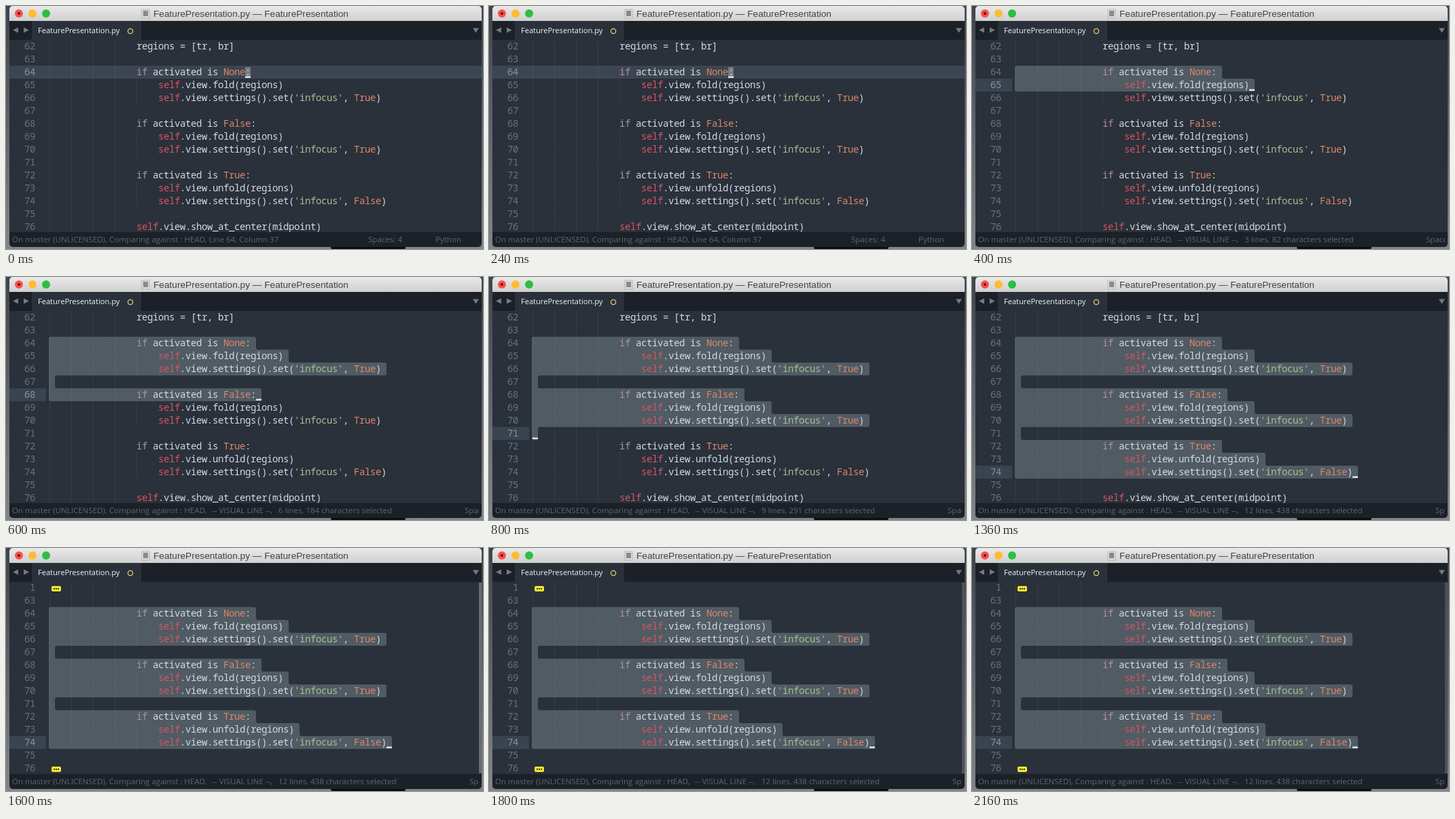
These frames come from a looping animation (702x358 px, 2.4 s). An HTML page:

```html
<!DOCTYPE html>
<html lang="en">
<head>
<meta charset="utf-8">
<title>Editor selection</title>
<style>
  html, body { margin: 0; width: 100%; height: 100%; overflow: hidden; background: #15181c; }
  svg { display: block; }
  text { white-space: pre; }
  .code { font: 500 14px "Noto Sans Mono", "DejaVu Sans Mono", monospace; letter-spacing: -.4px; font-variant-ligatures: none; fill: #d5dae1; }
  .num { fill: #65737e; }
  .num.on { fill: #87929c; }
  .key { fill: #b48ead; }
  .self { fill: #d6565f; }
  .const { fill: #dc8768; }
  .str { fill: #a8c08e; }
  .title { font: 13.66px "Liberation Sans", Arial, sans-serif; fill: #414141; }
  .tab { font: 500 11.1px "Open Sans", sans-serif; fill: #f2f4f6; }
  .status { font: 11.57px "Open Sans", sans-serif; fill: #5d6873; }
</style>
</head>
<body>
<svg width="702" height="358" viewBox="0 0 702 358">
  <defs>
    <linearGradient id="bar" x2="0" y2="1">
      <stop stop-color="#e9e9e9"/><stop offset="1" stop-color="#d0d0d0"/>
    </linearGradient>
    <linearGradient id="desktop" x2="0" y2="1">
      <stop stop-color="#3d444c"/><stop offset="1" stop-color="#80858b"/>
    </linearGradient>
    <clipPath id="window"><rect x="5" width="695" height="355" rx="5"/></clipPath>
    <clipPath id="statusArea"><rect x="5" y="333" width="691" height="22"/></clipPath>
  </defs>
  <rect width="702" height="358" fill="url(#desktop)"/>
  <rect x="478" y="354" width="110" height="4" rx="2" fill="#0c0d0f"/>
  <g clip-path="url(#window)">
    <rect x="5" y="50" width="695" height="284" fill="#2a313b"/>
    <g id="editor"></g>
    <rect x="5" width="695" height="22" fill="url(#bar)"/>
    <circle cx="19" cy="11" r="6" fill="#fc4f4b"/>
    <circle cx="19" cy="11" r="2" fill="#5c0d0b"/>
    <circle cx="39" cy="11" r="6" fill="#fdbc32"/>
    <circle cx="59" cy="11" r="6" fill="#2cbf40"/>
    <rect x="200" y="5" width="11" height="13" fill="#dcdcdc" stroke="#a5a5a5" stroke-width=".7"/>
    <rect x="202" y="7" width="7" height="8" fill="#8a8a8a"/>
    <text class="title" x="217" y="16">FeaturePresentation.py — FeaturePresentation</text>
    <rect x="5" y="22" width="695" height="28" fill="#1c2027"/>
    <rect x="38" y="22" width="161" height="28" fill="#2a313b"/>
    <path d="M18 31.5v8l-8-4zM26 31.5v8l8-4zM687 32.5h9l-4.5 7z" fill="#737a82"/>
    <text class="tab" x="47" y="40">FeaturePresentation.py</text>
    <circle cx="183" cy="37" r="3.6" fill="none" stroke="#e5cd7c" stroke-width="1.3"/>
    <rect x="5" y="333" width="695" height="22" fill="#1c2027"/>
    <g id="status" class="status" clip-path="url(#statusArea)"></g>
  </g>
</svg>
<script>
const LOOP = 2400, FIRST = 62, LAST = 76, ROW = 19, CELL = 8, LEFT = 64;
const editorLayer = document.getElementById('editor');
const statusLayer = document.getElementById('status');

const block = (value, call, flag) => [
  [16, `if activated is ${value}:`],
  [20, `self.view.${call}(regions)`],
  [20, `self.view.settings().set('infocus', ${flag})`],
  [0, '']
];
const lines = [
  [16, 'regions = [tr, br]'], [0, ''],
  ...block('None', 'fold', 'True'),
  ...block('False', 'fold', 'True'),
  ...block('True', 'unfold', 'False'),
  [16, 'self.view.show_at_center(midpoint)']
];

const states = [
  { at: 0, line: 64 },
  { at: 400, line: 65, chars: 82, spacesX: 668 },
  { at: 600, line: 68, chars: 184, spacesX: 675 },
  { at: 800, line: 71, chars: 291, spacesX: 675 },
  { at: 1000, line: 74, chars: 438, spacesX: 682 },
  { at: 1600, line: 74, chars: 438, spacesX: 682, folded: true, thumb: '#666d75' },
  { at: 1800, line: 74, chars: 438, spacesX: 682, folded: true, thumb: '#4b525b' }
];

const rowTop = n => 50 + (n - FIRST) * ROW;
const endX = n => {
  const [indent, code] = lines[n - FIRST];
  return LEFT + (indent + code.length) * CELL;
};
const rect = (x, y, w, h, fill, rx = 0) =>
  `<rect x="${x}" y="${y}" width="${w}" height="${h}" rx="${rx}" fill="${fill}"/>`;
const label = (x, y, body, cls = '') => `<text class="${cls}" x="${x}" y="${y}">${body}</text>`;

const tokenClass = word =>
  word === 'if' ? 'key' : word === 'self' ? 'self' : word[0] === "'" ? 'str' : 'const';
const highlight = code => code.replace(/\bif\b|\bself\b|'\w+'|None|True|False/g,
  word => `<tspan class="${tokenClass(word)}">${word}</tspan>`);

// Closed polygon with every corner rounded.
function roundedPath(points, r) {
  const toward = ([x, y], [u, v]) => {
    const k = r / Math.hypot(u - x, v - y);
    return `${x + (u - x) * k} ${y + (v - y) * k}`;
  };
  return points.map((p, i) => {
    const before = points.at(i - 1), after = points[(i + 1) % points.length];
    return `${i ? 'L' : 'M'}${toward(p, before)}Q${p} ${toward(p, after)}`;
  }).join('') + 'Z';
}

function selection(last) {
  const points = [[63, rowTop(64)]];
  for (let n = 64; n <= last; n++) {
    const x = endX(n) + CELL;
    points.push([x, rowTop(n)], [x, rowTop(n + 1)]);
  }
  points.push([63, rowTop(last + 1)]);
  return `<path d="${roundedPath(points, 3)}" fill="#505b64"/>`;
}

function whitespace(last) {
  let dots = '';
  for (let n = 64; n <= last; n++) {
    const [indent] = lines[n - FIRST];
    if (indent) dots += `M${LEFT + 3.5} ${rowTop(n) + 9.5}h${indent * CELL - 4}`;
  }
  return `<path d="${dots}" stroke="#66727d" stroke-dasharray="1 7"/>`;
}

function guides(folded) {
  const end = rowTop(folded ? 75 : LAST + 1);
  let d = '';
  for (let x = LEFT; x < 192; x += 32) d += `M${x + .5} 51V${end}`;
  lines.forEach(([indent], i) => {
    if (indent === 20) d += `M192.5 ${rowTop(FIRST + i)}v${ROW}`;
  });
  return `<path d="${d}" stroke="#fff" stroke-opacity=".1" stroke-dasharray="1 1"/>`;
}

const fold = n => rect(67, rowTop(n) + 7, 14, 8, '#f6e72f', 2) +
  [70, 73, 76].map(x => rect(x, rowTop(n) + 10, 2, 2, '#3a3920')).join('');

function drawEditor({ line, chars, folded, thumb }) {
  let out = rect(5, rowTop(line), chars ? 54 : 695, ROW, chars ? '#3a444f' : '#3d4650');
  if (chars) out += selection(line) + whitespace(line);
  out += guides(folded);
  const cursorX = chars ? endX(line) : endX(line) - CELL;
  if (!chars) out += rect(cursorX, rowTop(line) + 2, CELL, 15, '#747d87');
  out += rect(cursorX, rowTop(line) + 15.5, CELL, 2.5, '#dfe3e7');

  lines.forEach(([indent, code], i) => {
    const n = FIRST + i, y = rowTop(n) + 14;
    const hidden = folded && (n === FIRST || n === LAST);
    const number = hidden && n === FIRST ? ' 1' : n;
    out += label(27, y, number, n === line ? 'code num on' : 'code num');
    out += hidden ? fold(n) : label(LEFT + indent * CELL, y, highlight(code), 'code');
  });
  return `<g transform="translate(0 ${folded ? -1 : 0})">${out}</g>` +
    (thumb ? rect(696, 51, 4, 281, thumb) : '');
}

function drawStatus({ line, chars, spacesX }) {
  const y = 348, start = 'On master (UNLICENSED), Comparing against : HEAD,';
  if (!chars) {
    return label(9, y, `${start} Line ${line}, Column 37`) +
      label(533, y, 'Spaces: 4') + label(632, y, 'Python');
  }
  return label(9, y, start) + label(303, y, '-- VISUAL LINE --,') +
    label(401, y, `${line - 62} lines, ${chars} characters selected`) +
    label(spacesX, y, 'Spaces: 4');
}

let shown;
function render(time) {
  const state = states.findLast(s => s.at <= time % LOOP);
  if (state !== shown) {
    shown = state;
    editorLayer.innerHTML = drawEditor(state);
    statusLayer.innerHTML = drawStatus(state);
  }
}

const began = performance.now();
function tick() {
  render(Math.max(0, performance.now() - began));
  requestAnimationFrame(tick);
}
tick();
</script>
</body>
</html>
```
